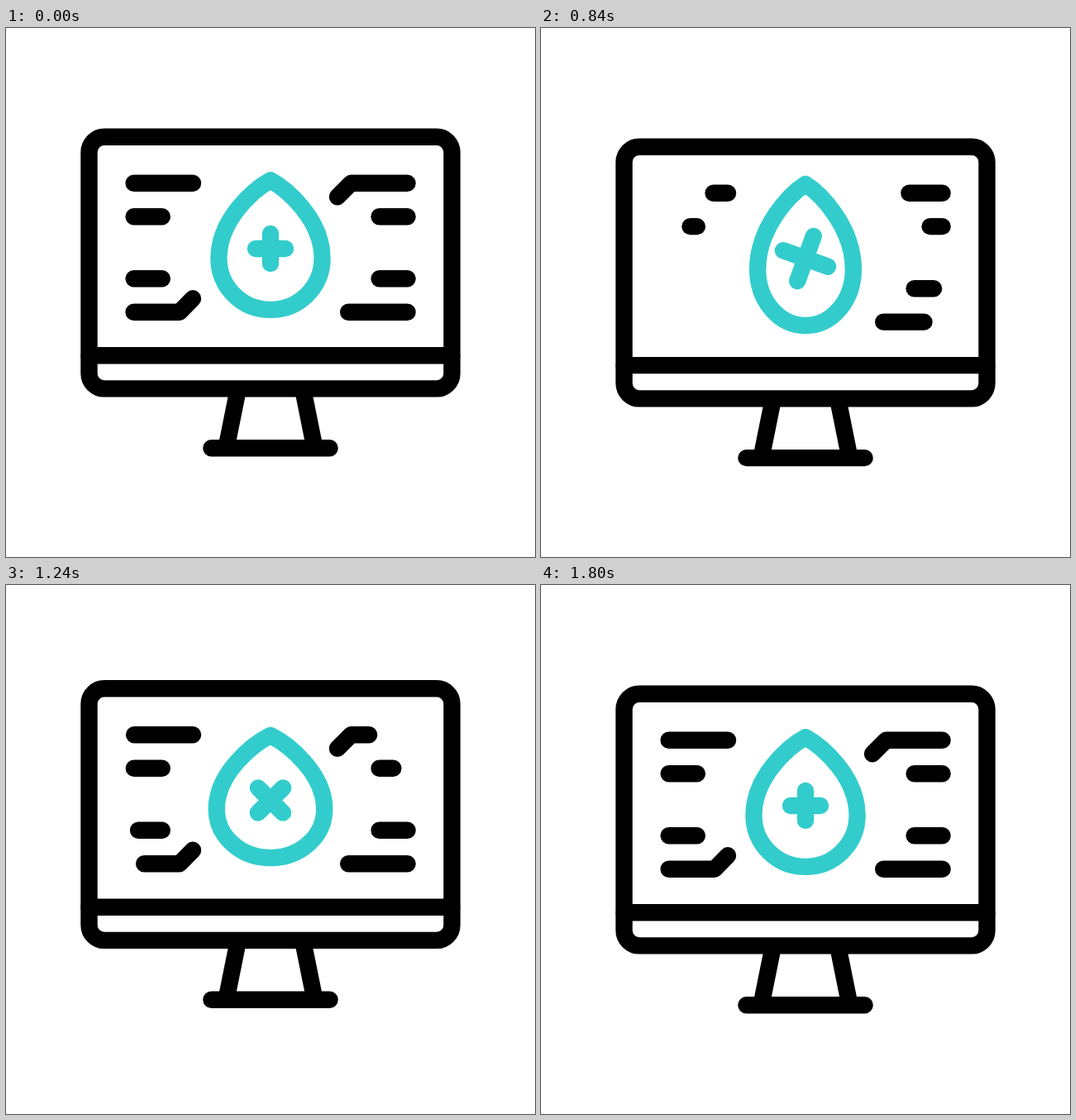
These frames come from a looping animation (640 by 640 pixels, 2000 ms). An HTML page:

```html
<!DOCTYPE html>
<html>
<head>
<meta charset="utf-8">
<style>
html, body { margin: 0; width: 100%; height: 100%; overflow: hidden; background: #fff; }
svg { display: block; width: 100%; height: 100%; }
</style>
</head>
<body>
<svg viewBox="0 0 640 640" fill="none" stroke="#000" stroke-width="20.4" stroke-linecap="round" stroke-linejoin="round">
  <g id="monitor">
    <rect x="100.5" y="131.8" width="439" height="304.6" rx="18.5"/>
    <path d="M100.5 396.2H539.5M280 441L266.5 508M360 441L373.5 508M248.4 508.2H391.6"/>
    <g id="lines"></g>
    <g stroke="#3cc">
      <path id="drop"/>
      <path id="plus"/>
    </g>
  </g>
</svg>
<script>
const LOOP = 2000, STEP = 40;
const $ = id => document.getElementById(id);
const clamp = p => Math.min(1, Math.max(0, p));

// Symmetric cubic-bezier(a, 0, 1 - a, 1), solved by bisection
function ease(p, a) {
  let lo = 0, hi = 1, s = .5;
  for (let i = 0; i < 24; i++) {
    s = (lo + hi) / 2;
    const r = 1 - s;
    const x = 3 * a * s * r * r + 3 * (1 - a) * s * s * r + s * s * s;
    if (x < p) lo = s; else hi = s;
  }
  return s * s * (3 - 2 * s);
}

// Value at t along eased [time, value] keys
function track(t, keys, a = .5) {
  if (t <= keys[0][0]) return keys[0][1];
  for (let i = 1; i < keys.length; i++) {
    const [t0, v0] = keys[i - 1], [t1, v1] = keys[i];
    if (t < t1) return v0 + (v1 - v0) * ease((t - t0) / (t1 - t0), a);
  }
  return keys[keys.length - 1][1];
}

const LIFT = [[520, 0], [800, 13], [1080, -21], [1400, 8], [1800, 0]];
const WIDE = [[40, 1], [520, 1.09], [960, .9], [1320, 1.055], [1800, 1]];
const TALL = [[40, 1], [520, .9], [960, 1.12], [1320, .93], [1800, 1]];
const SPIN = [[315, 0], [1605, 360]];
const GROW = [[500, 1], [960, 1.667], [1420, 1]];

// Each path starts at the end that vanishes and returns first
const lines = [
  ["M451.6 303.3H485.6", 0], ["M414.2 343.7H485.6", 0],
  ["M226 187.8H154.6", 1], ["M188.8 228.2H154.6", 1],
  ["M188.8 303.3H154.6", 2], ["M226 327.3L210 343.7H154.6", 2],
  ["M401 204.2L417.5 187.8H485.6", 3], ["M451.6 228.2H485.6", 3]
].map(([d, order]) => {
  const el = document.createElementNS("http://www.w3.org/2000/svg", "path");
  el.setAttribute("d", d);
  $("lines").append(el);
  return { el, delay: order * 160, length: el.getTotalLength() };
});

function drawLine({ el, delay, length }, t) {
  const gone = clamp((t - delay - 42) / 425) ** 2;
  const back = 1 - (1 - clamp((t - delay - 613) / 512)) ** 2;
  const [from, to] = gone < 1 ? [gone, 1] : [0, back];
  el.style.display = to > from ? "" : "none";
  el.style.strokeDasharray = from > 0 || to < 1 ? `${(to - from) * length} ${length * 3}` : "none";
  el.style.strokeDashoffset = -from * length;
}

function dropPath(sx, sy) {
  const at = (x, y) => `${320 + x * sx} ${262.5 + y * sy} `;
  return "M" + at(0, -78.3) +
    "C" + at(-20, -67.5) + at(-62.6, -30.5) + at(-62.6, 16) +
    "C" + at(-62.6, 50.6) + at(-34.6, 78.4) + at(0, 78.4) +
    "C" + at(34.6, 78.4) + at(62.6, 50.6) + at(62.6, 16) +
    "C" + at(62.6, -30.5) + at(20, -67.5) + at(0, -78.3) + "Z";
}

function draw() {
  const t = Math.floor(performance.now() % LOOP / STEP) * STEP;
  $("monitor").setAttribute("transform", `translate(0 ${track(t, LIFT)})`);
  $("drop").setAttribute("d", dropPath(track(t, WIDE), track(t, TALL)));
  const arm = 18 * track(t, GROW, .55);
  $("plus").setAttribute("d", `M${-arm} 0H${arm}M0 ${-arm}V${arm}`);
  $("plus").setAttribute("transform", `translate(320 267) rotate(${track(t, SPIN, .55)})`);
  lines.forEach(line => drawLine(line, t));
  requestAnimationFrame(draw);
}
draw();
</script>
</body>
</html>
```
